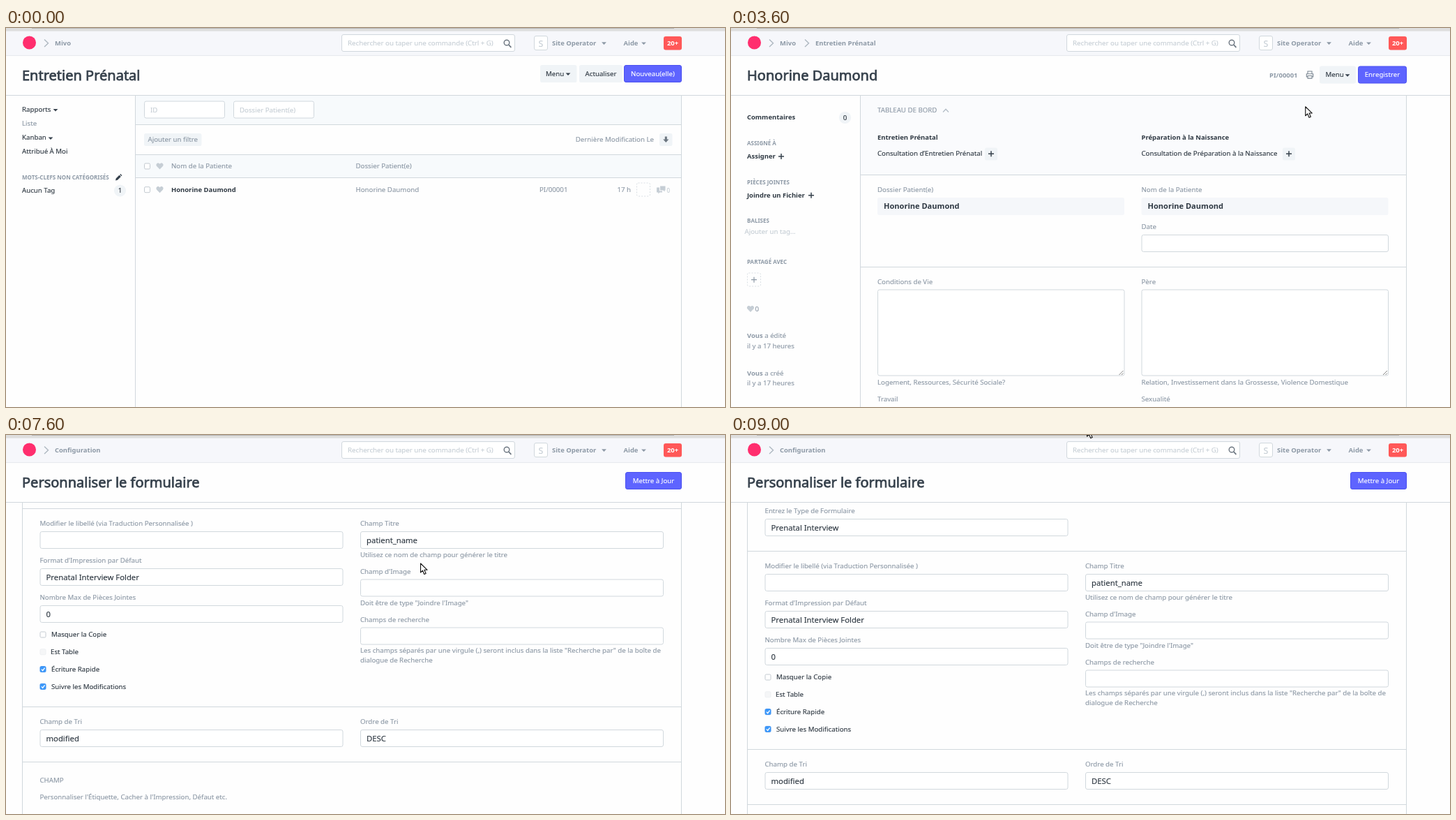
An HTML page for the animation above (9.3 s loop, 1031 by 543 pixels).

```html
<!DOCTYPE html>
<html lang="fr">
<head>
<meta charset="utf-8">
<title>Personnaliser le formulaire</title>
<style>
html, body { margin: 0; width: 100%; height: 100%; overflow: hidden; background: #fefefe; }
svg { display: block; width: 1031px; height: 543px; font-family: "Noto Sans", "Open Sans", sans-serif; }
text { font-size: 9.7px; color: #2f3943; fill: currentColor; stroke: currentColor; stroke-width: .14px; white-space: pre; }
.b { font-weight: 700; font-size: 9.45px; stroke: none; }
.m { color: #8d99a6; }
.p { color: #c6ced5; }
.w { color: #fff; }
.caps { font-size: 8px; font-weight: 700; color: #8d99a6; stroke: none; }
.in { font-size: 11.3px; }
.inb { font-size: 11.05px; font-weight: 700; stroke: none; }
.title { font-size: 20px; color: #36414c; stroke-width: .75px; }
.big { font-size: 12.5px; }
.tip { font-size: 12.6px; color: #f0f0f0; }
.menu { filter: drop-shadow(0 5px 4.5px rgba(0, 0, 0, .175)); }
</style>
</head>
<body>
<svg id="stage" viewBox="0 0 1031 543"></svg>
<script>
const LINE = '#d1d8dd', SOFT = '#f0f4f7', BAND = '#f7fafc', GREY = '#8d99a6',
      DARK = '#36414c', BLUE = '#5e64ff', PALE = '#c6ced5';
const PATIENT = 'Honorine Daumond';
const stage = document.getElementById('stage');
let layer = stage;

function add(tag, attrs, parent = layer) {
  const node = document.createElementNS('http://www.w3.org/2000/svg', tag);
  for (const k in attrs) node.setAttribute(k, attrs[k]);
  return parent.appendChild(node);
}
function group(build, parent = stage, attrs = {}) {
  const before = layer, g = layer = add('g', attrs, parent);
  build();
  layer = before;
  return g;
}
function text(x, y, s, cls = '', anchor = 'start') {
  const node = add('text', { x, y, dy: '.36em', class: cls, 'text-anchor': anchor });
  node.innerHTML = s;
  return node;
}
const rect = (x, y, w, h, fill, more) => add('rect', { x, y, width: w, height: h, fill, ...more });
const path = (d, fill = 'none', more) => add('path', { d, fill, ...more });
const stroke = (d, color, width = 1, more) => path(d, 'none', { stroke: color, 'stroke-width': width, ...more });
const hline = (y, x1, x2) => stroke(`M${x1} ${y}H${x2}`, LINE);
const vline = (x, y1, y2) => stroke(`M${x} ${y1}V${y2}`, LINE);
const box = (x, y, w, h, more) =>
  rect(x + .5, y + .5, w - 1, h - 1, '#fff', { stroke: LINE, rx: 2.5, ...more });
function button(x, y, w, h, label, cls = '', fill = SOFT) {
  const r = rect(x, y, w, h, fill, { rx: 2.5 });
  text(x + w / 2, y + h / 2, label, cls, 'middle');
  return r;
}
function primary(x, y, w, label) {
  rect(x + .5, y + .5, w - 1, 24, BLUE, { rx: 2.5, stroke: '#4a50f0' });
  text(x + w / 2, y + 12.3, label, 'w', 'middle');
}
const caret = (x, y, fill = DARK) => path(`M${x - 3.4} ${y - 1.5}h6.8l-3.4 3.6z`, fill);
const chevron = x => stroke(`M${x} 16.5l5.5 5.2l-5.5 5.2`, '#aeb8c1', 1.4);
const plus = (x, y, r = 4, color = DARK, width = 1.5) =>
  stroke(`M${x - r} ${y}h${2 * r}M${x} ${y - r}v${2 * r}`, color, width);
const heart = (x, y, fill = PALE) =>
  path(`M${x} ${y + 4.5}l-4.4-4.5c-2.2-3 1.6-6.6 4.4-3.2c2.8-3.4 6.6 .2 4.4 3.2z`, fill);
const dashed = (x, y, s) =>
  rect(x + .5, y + .5, s, s, 'none', { stroke: '#d9dfe4', 'stroke-dasharray': '2 2', rx: 2 });
function check(x, y, on, faint) {
  rect(x + .5, y - 4, 8, 8, on ? '#3b99fc' : faint ? '#f5f6f7' : '#fff',
       { rx: 1.5, stroke: on ? '#3b8ff0' : faint ? '#eef0f2' : '#c3cad0' });
  if (on) stroke(`M${x + 2.4} ${y}l1.7 2l3-4`, '#fff', 1.4);
}
function count(y, n) {
  add('circle', { cx: 163.5, cy: y, r: 8.6, fill: SOFT });
  text(163.5, y, n, '', 'middle');
}
function field(x, y, w, label, value = '') {
  text(x, y - 11, label, 'm');
  box(x, y, w, 25);
  text(x + 9, y + 12.5, value, 'in');
}
function crumbs(...names) {
  let x = 70;
  for (const name of names) {
    chevron(x - 15);
    text(x, 22, name, 'b m');
    x += 51;
  }
}
const title = s => text(23, 68, s, 'title');

// Shared frame
rect(0, 0, 1031, 543, '#fefefe');
rect(0, 0, 1031, 40, '#f6f7fb');
rect(0, 0, 1031, 4.5, '#dedede');
rect(37, 0, 921, 1, '#b4b4b4');
stroke('M0 39.5H1031', '#e6e9ee');
add('circle', { cx: 33.5, cy: 21, r: 9.5, fill: '#ff2e6e' });
box(481, 9, 249, 25);
text(490, 22, 'Rechercher ou taper une commande (Ctrl + G)', 'p');
add('circle', { cx: 718, cy: 21, r: 3.8, fill: 'none', stroke: '#6c7680', 'stroke-width': 1.4 });
stroke('M720.8 24l3.6 3.8', '#6c7680', 1.8);
box(757, 11, 20, 21);
text(767, 22, 'S', 'p big', 'middle');
text(783, 21.5, 'Site Operator', 'b m');
caret(857.5, 21.8, GREY);
text(885.5, 21.5, 'Aide', 'b m');
caret(914.5, 22, GREY);
rect(943, 12, 26, 19.5, '#ff5858', { rx: 3 });
text(956, 21.8, '20+', 'b w', 'middle');
hline(96.5, 0, 1031);

// List page
let rowHover, tooltip;
const list = group(() => {
  crumbs('Mivo');
  title('Entretien Prénatal');
  rect(766, 53, 52.5, 25, SOFT, { rx: 2.5 });
  text(774, 65.3, 'Menu');
  caret(806, 66);
  button(822, 53, 62, 25, 'Actualiser');
  primary(886, 53, 83, 'Nouveau(elle)');

  text(23, 116.7, 'Rapports');
  caret(71, 117.5);
  text(23, 136.7, 'Liste', 'm');
  text(23, 157, 'Kanban');
  caret(64, 158);
  text(23, 177, 'Attribué À Moi');
  text(23, 214.5, 'MOTS-CLEFS NON CATÉGORISÉS', 'caps');
  path('M157 218.5l.7-3l4.8-4.8l2.3 2.3l-4.8 4.8zM163.2 210l1-.9l2.2 2.2l-1 1z', DARK);
  text(23, 232.7, 'Aucun Tag');
  count(233, '1');

  rect(186, 97, 782, 41, BAND);
  rect(186, 181, 782, 33, BAND);
  rowHover = rect(186, 215, 782, 33, BAND);
  vline(185.5, 97, 543);
  vline(968.5, 97, 543);
  [138.5, 181.5, 214.5].forEach(y => hline(y, 186, 968));
  box(198, 104.5, 116, 25);
  text(207, 117.5, 'ID', 'p');
  box(326, 104.5, 116, 25);
  text(335, 117.5, 'Dossier Patient(e)', 'p');
  button(198, 151, 82.5, 18, 'Ajouter un filtre', 'm');
  text(929, 160, 'Dernière Modification Le', 'm', 'end');
  rect(937, 151, 18.5, 18, SOFT, { rx: 2.5 });
  path('M944.8 155.5h3v4h2.6l-4.1 4.6l-4.1-4.6h2.6z', '#6c7680');
  for (const y of [198, 231.7]) {
    check(198, y);
    heart(220.5, y);
  }
  text(237, 198, 'Nom de la Patiente', 'm');
  text(501.5, 198, 'Dossier Patient(e)', 'm');
  text(237, 231.7, PATIENT, 'b');
  text(501.5, 231.7, PATIENT, 'm');
  text(765, 231.7, 'PI/00001', 'm');
  text(896, 231.7, '17 h', 'm', 'end');
  dashed(904, 221.5, 19);
  path('M938 226.5h7.5v6h-1v2l-2.2-2h-4.3z', PALE);
  path('M933 228.5h4v5h4v2h-3.5l-2.2 2v-2h-2.3z', PALE);
  text(947.5, 232.7, '0', 'p').style.fontSize = '8px';

  tooltip = group(() => {
    rect(380, 249, 155, 21, '#000', { opacity: .12, rx: 2 });
    rect(378, 246.5, 155, 21.5, '#444');
    rect(378, 246.5, 68, 21.5, '#636363');
    text(385, 256.7, 'title_field', 'tip');
  }, layer);
});

// Record page
let menu, menuButton;
const record = group(() => {
  crumbs('Mivo', 'Entretien Prénatal');
  title(PATIENT);
  text(772, 67.5, 'PI/00001', 'b m');
  stroke('M827 65.5v-3.5h6v3.5M827 70h-1.7v-4.3h9.4v4.3H833M827 68.5h6v3.6h-6z', '#7b8792', 1.1);
  menuButton = rect(844, 54.5, 52, 25, SOFT, { rx: 2.5 });
  text(852.5, 67, 'Menu');
  caret(884, 67.7);
  primary(899, 54.5, 70, 'Enregistrer');

  text(23, 128, 'Commentaires', 'b');
  count(128.3, '0');
  text(23, 165.5, 'ASSIGNÉ À', 'caps');
  text(23, 184, 'Assigner', 'b');
  plus(72, 184);
  text(23, 221, 'PIÈCES JOINTES', 'caps');
  text(23, 239.5, 'Joindre un Fichier', 'b');
  plus(115, 239.7);
  text(23, 276.5, 'BALISES', 'caps');
  text(19.5, 291.5, 'Ajouter un tag...', 'p');
  text(23, 335.5, 'PARTAGÉ AVEC', 'caps');
  dashed(23, 350.5, 19);
  plus(33, 360.7, 4, GREY, 1.2);
  heart(28, 402.5);
  text(34.5, 402.7, '0', 'm');
  [[441, 'a édité'], [494.5, 'a créé']].forEach(([y, verb]) => {
    text(23, y, `<tspan class="b m">Vous</tspan> ${verb}`, 'm');
    text(23, y + 14.2, 'il y a 17 heures', 'm');
  });

  rect(186, 97, 782, 113, '#fafbfd');
  vline(185.5, 97, 543);
  vline(968.5, 97, 543);
  hline(210.5, 186, 968);
  hline(342.5, 186, 968);
  text(210, 118, 'TABLEAU DE BORD', 'm');
  stroke('M304 120.5l4-4.2l4 4.2', '#b4bec7', 1.3);
  text(210, 156.5, 'Entretien Prénatal', 'b');
  text(210, 180, 'Consultation d’Entretien Prénatal');
  text(588.5, 156.5, 'Préparation à la Naissance', 'b');
  text(588.5, 180, 'Consultation de Préparation à la Naissance');
  for (const x of [373, 800]) {
    rect(x - 9, 171.5, 18, 18, SOFT, { rx: 2.5 });
    plus(x, 180.3);
  }
  [[210, 'Dossier Patient(e)'], [588.5, 'Nom de la Patiente']].forEach(([x, label]) => {
    text(x, 231.7, label, 'm');
    rect(x, 243, 354, 25, '#f5f7fa', { rx: 2.5 });
    text(x + 9, 255.5, PATIENT, 'inb');
  });
  field(588.5, 296, 354.5, 'Date');
  [
    [210, 'Conditions de Vie', 'Logement, Ressources, Sécurité Sociale?', 'Travail'],
    [588.5, 'Père', 'Relation, Investissement dans la Grossesse, Violence Domestique', 'Sexualité']
  ].forEach(([x, label, hint, next]) => {
    text(x, 363.7, label, 'm');
    box(x, 374.5, 354.5, 124);
    stroke(`M${x + 346.5} 497l6-6M${x + 350} 497l2.5-2.5`, '#777', .9);
    text(x, 508, hint, 'm');
    text(x, 532, next, 'm');
  });

  menu = group(() => {
    rect(731.5, 81.5, 164.5, 313, '#fff', { class: 'menu', stroke: '#d2d5d8', rx: 3 });
    ['Imprimer', 'E-mail', 'Liens', 'Dupliquer', 'Recharger', 'Supprimer', 'Personnaliser',
     'Nouveau(elle) Entretien'].forEach((s, i) => text(743, 101 + i * 37.3, s));
    text(743, 376.3, 'Prénatal (Ctrl + B)');
  }, layer);
});

// Form customisation page
const clip = add('clipPath', { id: 'body' });
add('rect', { x: 0, y: 97, width: 1031, height: 446 }, clip);
let sheet;
const custom = group(() => {
  crumbs('Configuration');
  title('Personnaliser le formulaire');
  primary(888, 53, 81, 'Mettre à Jour');
  const view = add('g', { 'clip-path': 'url(#body)' });
  sheet = group(() => {
    rect(24, 97, 944, 34, BAND);
    [[452, 117, 'Actualiser le Formulaire'], [578, 95, 'Rétablir par défaut'],
     [682, 118, 'Définir les Autorisations'], [809, 146, 'Exporter les Personnalisations']]
      .forEach(([x, w, s]) => button(x, 104.5, w, 18, s));
    [131.5, 210.5, 494.5, 573.5].forEach(y => hline(y, 24, 968));
    const L = 48.5, R = 508, W = 435;
    field(L, 164, W, 'Entrez le Type de Formulaire', 'Prenatal Interview');
    field(L, 243, W, 'Modifier le libellé (via Traduction Personnalisée )');
    field(L, 296, W, "Format d'Impression par Défaut", 'Prenatal Interview Folder');
    field(L, 349, W, 'Nombre Max de Pièces Jointes', '0');
    ['Masquer la Copie', 'Est Table', 'Écriture Rapide', 'Suivre les Modifications'].forEach((s, i) => {
      const y = 391 + i * 24.8;
      check(48.5, y, i > 1, i === 1);
      text(i === 1 ? 64 : 65, y, s);
    });
    field(R, 243, W, 'Champ Titre', 'patient_name');
    text(R, 276.7, 'Utilisez ce nom de champ pour générer le titre', 'm');
    field(R, 311.5, W, "Champ d'Image");
    text(R, 345.3, 'Doit être de type "Joindre l\'Image"', 'm');
    field(R, 380.5, W, 'Champs de recherche');
    text(R, 414, 'Les champs séparés par une virgule (,) seront inclus dans la liste "Recherche par" de la boîte de', 'm');
    text(R, 427.3, 'dialogue de Recherche', 'm');
    field(L, 527, W, 'Champ de Tri', 'modified');
    field(R, 527, W, 'Ordre de Tri', 'DESC');
    text(L, 600, 'CHAMP', 'm');
    text(L, 624, "Personnaliser l'Étiquette, Cacher à l'Impression, Défaut etc.", 'm');
    text(57, 655.5, 'Aide', 'in');
    rect(49, 673, 894, 32, BAND);
    hline(672.5, 49, 943);
    [49, 123, 271, 421, 569, 793, 943].forEach((x, i) => {
      vline(x + .5, 672, 705);
      text(x + 9, 688.5, ['', 'Étiquette', 'Type', 'Nom', 'Options', '', ''][i], 'b m');
    });
    check(57.5, 690);
  }, view);
  vline(23.5, 97, 543);
  vline(968.5, 97, 543);
});

// Pointers, each drawn around its hot spot
const edge = { stroke: '#111', 'stroke-width': 1.1, 'stroke-linejoin': 'round' };
const pointers = {
  arrow: group(() => path('M0 0V13l3-2.8l2.2 5.3l2.4-1l-2.2-5.2H9.6z', '#fff', edge)),
  hand: group(() => {
    path('M-1.4 1.2c0-1.6 2.4-1.6 2.4 0v4c.6-1 2.3-.7 2.4.3c.8-.6 2.2-.3 2.3.7c1-.4 2.2 0 2.2 1.2v3.2l-1.3 3.2h-6.6l-3.8-5.2c-.7-1.5 1.2-2.2 2.4-.6z', '#fff', edge);
    stroke('M1.2 9v3M3.3 9v3M5.4 9v3', '#111', .7);
  }),
  beam: group(() => {
    const d = 'M-3.5-6.5h2.5l1 .8l1-.8h2.5M-3.5 6.5h2.5l1-.8l1 .8h2.5M0-6V6';
    stroke(d, '#fff', 3.2);
    stroke(d, '#111', 1.4);
  })
};

const LOOP = 9300, STEP = 100;
// time, x, y, pointer kind
const moves = [
  [1400, 420, 322, 'arrow'], [1800, 396, 252, 'arrow'], [1900, 384, 238, 'hand'],
  [2100, 370.5, 232, 'hand'], [2700, 370, 232, 'arrow'], [3000, 370, 232, 'arrow'],
  [3300, 520, 265, 'arrow'], [3700, 925, 62, 'arrow'], [3800, 908, 32, 'arrow'],
  [4000, 872, 64, 'hand'], [4700, 872, 64, 'hand'], [4900, 843, 195, 'hand'],
  [5000, 824, 279, 'hand'], [5400, 786, 327, 'hand'], [5900, 786, 327, 'arrow'],
  [6700, 786, 327, 'arrow'], [6800, 777, 288, 'beam'], [6900, 728, 258, 'arrow'],
  [7200, 593.5, 184, 'arrow'], [7800, 595, 184, 'beam'], [8100, 594, 184, 'arrow'],
  [8500, 594, 184, 'arrow'], [8900, 513, -7, 'arrow'], [9000, 510.5, -11, 'arrow']
];
const scroll = [[6800, 0], [7600, 105], [7800, 149], [8000, 149], [8600, 44]];

function sample(keys, t, col) {
  const i = keys.findIndex(k => k[0] > t);
  if (i < 0) return keys[keys.length - 1][col];
  if (i === 0) return keys[0][col];
  const a = keys[i - 1], b = keys[i];
  return a[col] + (b[col] - a[col]) * (t - a[0]) / (b[0] - a[0]);
}
const show = (node, on) => node.setAttribute('visibility', on ? 'inherit' : 'hidden');

function draw(now) {
  const t = Math.floor(Math.max(0, now - start) % LOOP / STEP) * STEP;
  show(list, t < 2700);
  show(record, t >= 2700 && t < 5900);
  show(custom, t >= 5900);
  show(rowHover, t >= 1900);
  show(tooltip, t >= 2500);
  show(menu, t >= 4200);
  menuButton.setAttribute('fill', t >= 4100 ? '#cfdbe5' : SOFT);
  sheet.setAttribute('transform', `translate(0 ${-Math.round(sample(scroll, t, 1))})`);

  const x = sample(moves, t, 1), y = sample(moves, t, 2);
  const last = moves.filter(m => m[0] <= t).pop();
  for (const kind in pointers) {
    show(pointers[kind], last && last[3] === kind);
    pointers[kind].setAttribute('transform', `translate(${x} ${y})`);
  }
  requestAnimationFrame(draw);
}
const start = performance.now();
draw(start);
</script>
</body>
</html>
```
